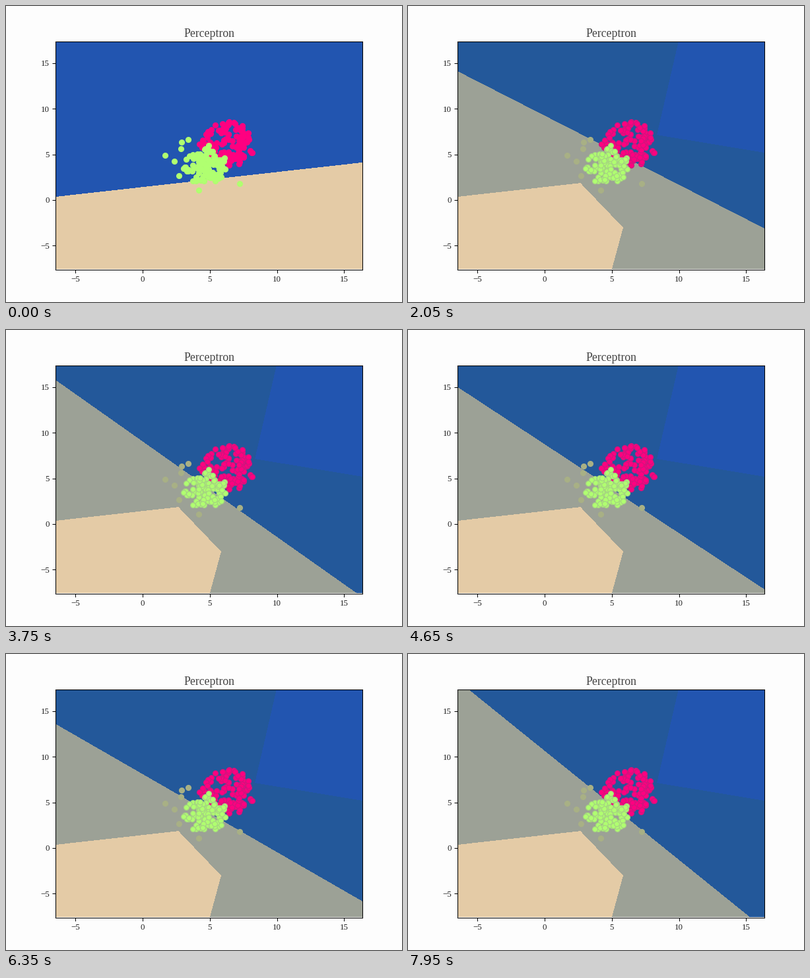
Write a matplotlib script that moves like this. It is 600x450 px and loops after 8 s.

```python
import numpy as np
import matplotlib.pyplot as plt
from matplotlib.animation import FuncAnimation

plt.rcParams["font.family"] = "Liberation Serif"

FRAMES, STEP, SETTLED = 160, 50, 21
LEFT, RIGHT, TOP, BOTTOM = 75, 540, 54, 400.5
XLIM, YLIM = (-6.48, 16.36), (-7.62, 17.37)
PIVOT = 300, 235
BLUE, TAN = (34, 85, 176), (228, 203, 166)
DEEP, GREY = (35, 88, 154), (156, 161, 150)
PINK, GREEN = "#ff0080", "#b0ff70"
PINK_RIM, GREEN_RIM, FADED = "#d3147d", "#a6d680", "#a8b085"

# Boundary as (frame, tilt in degrees, distance from the pivot in pixels):
# wide swings at first, then small changes around 30 degrees.
KEYS = np.array([
    (0, -6.4, 29.6), (1, 105.1, -51.6), (2, 103.0, -66.5), (3, 9.4, -50.1),
    (5, 46.3, 51.6), (SETTLED, 31.7, 10.1), (41, 27.1, -17.6), (75, 35.3, 1.0),
    (110, 27.5, 0.1), (143, 29.1, -11.1), (159, 39.0, -9.0)])

# Green points lying apart from their group.
STRAYS = [(241, 227), (255, 236), (265, 217), (266, 207), (276, 203),
          (262, 258), (292, 280), (354, 270)]

rng = np.random.default_rng(7)


def cloud(n, cx, cy, rx, ry):
    """Points spread over an ellipse, denser in the middle."""
    a = rng.uniform(0, 2 * np.pi, n)
    r = rng.uniform(0, 1, n) ** 0.6
    return np.column_stack([cx + rx * r * np.cos(a), cy + ry * r * np.sin(a)])


def to_data(points):
    x, y = np.asarray(points, float).T
    return (np.interp(x, (LEFT, RIGHT), XLIM),
            np.interp(y, (TOP, BOTTOM), YLIM[::-1]))


# Training steps drift between the keys, with a small shake on the way.
steps = np.arange(FRAMES)
shake = np.clip((steps - 5) / (SETTLED - 5), 0, 1)
shake[KEYS[:, 0].astype(int)] = 0
tilt = np.interp(steps, KEYS[:, 0], KEYS[:, 1]) + shake * rng.normal(0, 2, FRAMES)
dist = np.interp(steps, KEYS[:, 0], KEYS[:, 2]) + shake * rng.normal(0, 5, FRAMES)
gx, gy = np.meshgrid(np.arange(LEFT, RIGHT) + 0.5, np.arange(TOP, 400) + 0.5)


def below(i):
    a = np.radians(tilt[i])
    return (gy - PIVOT[1]) * np.cos(a) - (gx - PIVOT[0]) * np.sin(a) > dist[i]


# The frame at which each pixel first changes class.
start = below(0)
first = np.full(start.shape, FRAMES)
for k in range(FRAMES - 1, 0, -1):
    first[below(k) != start] = k


def regions(i):
    low, touched = below(i), first <= i
    img = np.where(low[..., None], TAN, BLUE).astype(np.uint8)
    img[touched & low] = GREY
    img[touched & ~low] = DEEP
    return img


fig = plt.figure(figsize=(6.4, 4.8), dpi=93.75, facecolor="#fdfdfd")
ax = fig.add_axes([0.125, 0.11, 0.775, 0.77])
image = ax.imshow(regions(0), extent=(*XLIM, *YLIM), aspect="auto",
                  interpolation="nearest", zorder=0)
ax.set_xlim(XLIM)
ax.set_ylim(YLIM)
ax.set_xticks(range(-5, 16, 5))
ax.set_yticks(range(-5, 16, 5))
ax.tick_params(labelsize=10, labelcolor="#222222")
ax.set_title("Perceptron", fontsize=13.6, color="#444444", pad=5)

pinks = ax.scatter(*to_data(cloud(105, 335, 209, 42, 36)), color=PINK, zorder=2)
strays = ax.scatter(*to_data(STRAYS), color=GREEN, zorder=3)
greens = ax.scatter(*to_data(np.vstack([cloud(95, 301, 243, 35, 27), (307, 212)])),
                    color=GREEN, zorder=4)


def draw(i):
    image.set_data(regions(i))
    pinks.set_edgecolor(PINK_RIM if i else PINK)
    greens.set_edgecolor(GREEN_RIM if i else GREEN)
    strays.set_color(FADED if i else GREEN)
    return image, pinks, strays, greens


anim = FuncAnimation(fig, draw, frames=FRAMES, interval=STEP, repeat=True,
                     repeat_delay=0, blit=False)
plt.show()
```
